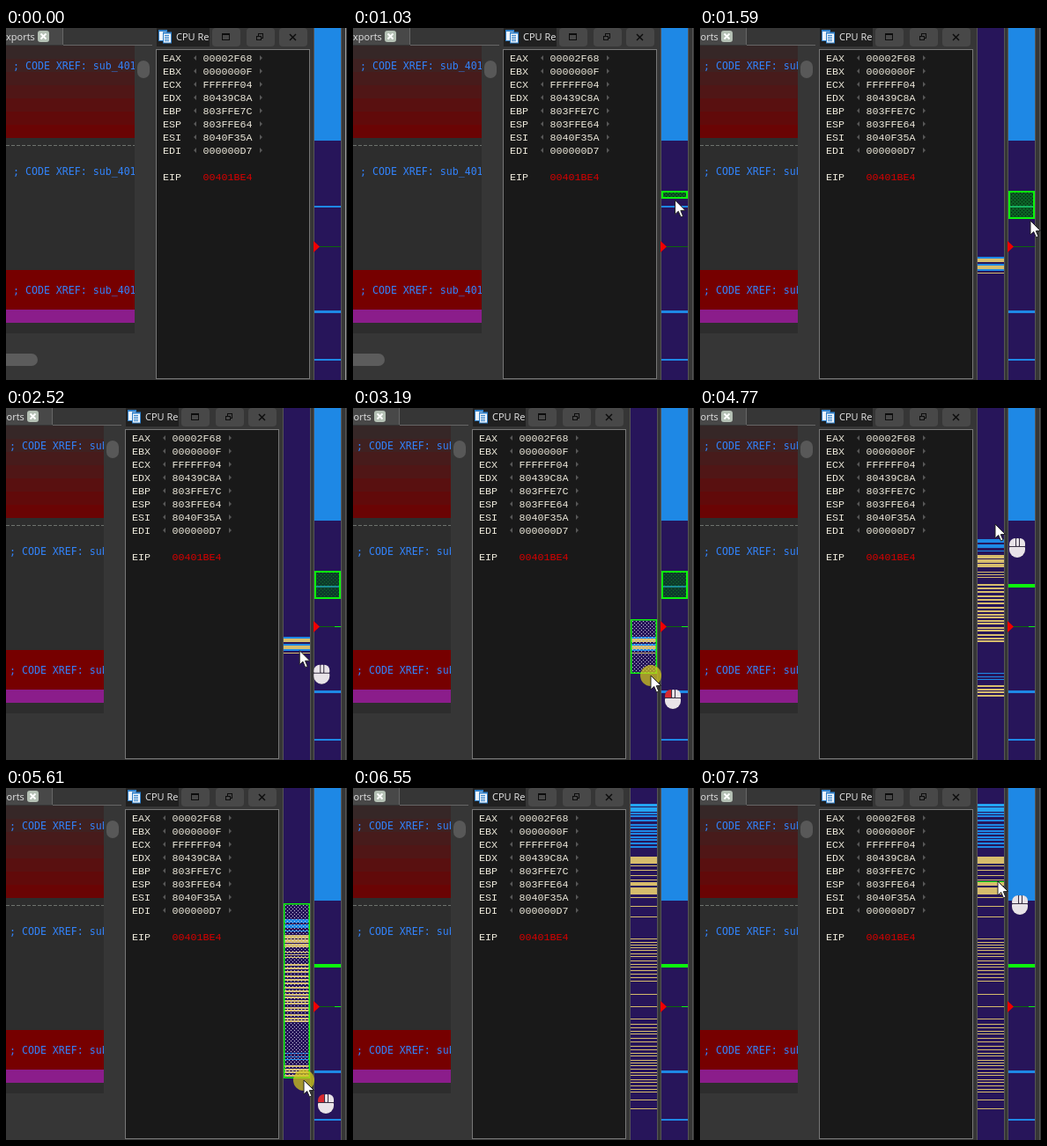
Write an HTML page with a canvas that moves like this. It is 387x400 px and loops after 8000 ms.

```html
<!DOCTYPE html>
<html lang="en">
<head>
<meta charset="utf-8">
<style>
html, body { margin: 0; width: 100%; height: 100%; overflow: hidden; background: #363636; }
canvas { display: block; }
</style>
</head>
<body>
<canvas width="387" height="400"></canvas>
<script>
const ctx = document.querySelector('canvas').getContext('2d');
const LOOP = 8000, SPLIT = 1540, MOUSE_ICON = 2160, ZOOM_1 = 3430, ZOOM_2 = 6120;
const PURPLE = '#27155a', BLUE = '#1e88e5', TAN = '#d6bc6c', GREEN = '#0cf50c', EDGE = '#555';
const CODE_FONT = '11.6px "DejaVu Sans Mono", monospace';
const REGISTER_FONT = '11.67px "Liberation Mono", monospace';
const TITLE_FONT = '11px "Open Sans", sans-serif';

const REGISTERS = ['EAX 00002F68', 'EBX 0000000F', 'ECX FFFFFF04', 'EDX 80439C8A',
  'EBP 803FFE7C', 'ESP 803FFE64', 'ESI 8040F35A', 'EDI 000000D7'];

// Pointer path: each move arrives at x, y and rests there until the next one
const ENTRY = { end: 480, x: 387, y: 231 };
const MOVES = [
  move(480, 790, 362, 187), move(960, 1220, 375, 219), move(1650, 1780, 392, 226),
  move(1780, 1900, 392, 402), move(1900, 2150, 345, 402),
  move(2160, 2620, 330, 241), move(2700, 3190, 338, 304), move(3430, 3700, 334, 308),
  move(3950, 4420, 333, 99), move(4500, 4700, 335, 132), move(4820, 5440, 338, 332),
  move(6300, 6550, 392, 402), move(6600, 6900, 392, 340),
  move(6910, 7300, 341, 148), move(7490, 7730, 338, 106),
];
function move(start, end, x, y) {
  return { start, end, x, y };
}

function rect(color, x, y, w, h) {
  ctx.fillStyle = color;
  ctx.fillRect(x, y, w, h);
}
function frame(color, x, y, w, h, width = 1) {
  ctx.strokeStyle = color;
  ctx.lineWidth = width;
  ctx.strokeRect(x + width / 2, y + width / 2, w - width, h - width);
}
function round(color, x, y, w, h, r) {
  ctx.beginPath();
  ctx.roundRect(x, y, w, h, r);
  ctx.fillStyle = color;
  ctx.fill();
}
function poly(color, points, border) {
  ctx.beginPath();
  points.forEach(([x, y]) => ctx.lineTo(x, y));
  ctx.closePath();
  ctx.fillStyle = color;
  ctx.fill();
  if (border) {
    ctx.strokeStyle = border;
    ctx.lineWidth = 1;
    ctx.stroke();
  }
}
function line(color, width, x0, y0, x1, y1) {
  ctx.beginPath();
  ctx.moveTo(x0, y0);
  ctx.lineTo(x1, y1);
  ctx.strokeStyle = color;
  ctx.lineWidth = width;
  ctx.stroke();
}
function cross(color, width, x, y, size) {
  line(color, width, x, y, x + size, y + size);
  line(color, width, x + size, y, x, y + size);
}
function label(str, x, y, color, font) {
  ctx.font = font;
  ctx.fillStyle = color;
  ctx.fillText(str, x, y);
}
function dots(color, x, y, w, h, step) {
  for (let row = 0; row * 2 < h; row++)
    for (let col = row % 2 * step / 2; col < w; col += step) rect(color, x + col, y + row * 2, 1, 1);
}
// Horizontal lines with slightly uneven spacing, always the same for a given start
function stripes(color, from, to, pitch, thickness) {
  let seed = from;
  for (let y = from; y < to;) {
    rect(color, 315, y, 30, Math.min(thickness, to - y));
    seed = (seed * 73 + 41) % 1009;
    y += Math.max(thickness, pitch + Math.round(seed / 1009 * 2 - 1));
  }
}

function drawEditor(split) {
  const right = split ? 111 : 146, textX = split ? 4 : 8, tabX = split ? -12 : 0;

  rect('#484848', 0, 0, 64 + tabX, 19);
  line('#666', 1, 64.5 + tabX, 0, 64.5 + tabX, 19);
  line('#666', 1, 65 + tabX, 19.5, right + 20, 19.5);
  label('xports', tabX, 14, '#e4e4e4', TITLE_FONT);
  round('#b4c0b4', 36 + tabX, 3, 13, 13, 3);
  cross('#fff', 2, 39.5 + tabX, 6.5, 6);

  ctx.save();
  ctx.beginPath();
  ctx.rect(0, 20, right, 327);
  ctx.clip();
  rect('#2d2d2d', 0, 20, right, 327);
  for (let i = 0; i < 7; i++) {
    const k = i / 6;
    rect(`rgb(${54 + 52 * k}, ${39 - 35 * k}, ${39 - 35 * k})`, 0, 20 + i * 15, right, 15);
  }
  ctx.setLineDash([4, 2]);
  line('#6d726d', 1, 0, 133.5, right, 133.5);
  ctx.setLineDash([]);
  rect('#760000', 0, 275, right, 45);
  rect('#8b1d8b', 0, 320, right, 15);
  [47, 167, 302].forEach(y => label('; CODE XREF: sub_401', textX, y, '#3282fa', CODE_FONT));
  ctx.restore();

  round('#585858', right + 3, 37, 14, 20, 7);
  if (!split) round('#5c5c5c', -10, 370, 46, 14, 7);
}

function drawRegister(name, value, baseline, color) {
  label(name, 178, baseline, '#eeeadc', REGISTER_FONT);
  label(value, 223.5, baseline, color, REGISTER_FONT);
}

function drawRegisters() {
  rect('#191919', 170, 24, 175, 375);
  frame('#777', 170, 24, 175, 375);
  rect('#202020', 171, 0, 60, 21);

  [0, 5].forEach(shift => {
    rect('#2f7fc8', 173 + shift, 2 + shift / 2, 10, 13);
    rect('#eef4fa', 174 + shift, 4 + shift / 2, 8, 10);
  });
  for (let y = 8; y < 16; y += 2) rect('#2f7fc8', 180, y, 5, 1);
  label('CPU Re', 193, 14, '#e8e8e8', TITLE_FONT);

  [234, 273, 310].forEach(x => round('#484848', x, 0, 32, 21, 4));
  const ink = '#0c0c0c';
  frame(ink, 245, 6, 9, 8);
  rect(ink, 245, 6, 9, 2);
  frame(ink, 286, 6, 6, 6);
  rect('#484848', 284, 9, 6, 5);
  frame(ink, 284, 9, 6, 5);
  cross(ink, 1.5, 322, 7, 7);

  REGISTERS.forEach((entry, i) => {
    const y = 38 + i * 15;
    drawRegister(...entry.split(' '), y, '#eeeadc');
    poly('#585858', [[216, y - 7], [213, y - 4], [216, y - 1]]);
    poly('#585858', [[288, y - 7], [291, y - 4], [288, y - 1]]);
  });
  drawRegister('EIP', '00401BE4', 173, '#d90000');
}

function drawMainStrip(t, pointer) {
  rect(PURPLE, 350, 0, 30, 400);
  rect(BLUE, 350, 0, 30, 128);
  rect(BLUE, 350, 321, 30, 3);
  rect(BLUE, 350, 376, 30, 2);
  [349, 380].forEach(x => rect(EDGE, x, 0, 1, 400));
  rect(t < 960 ? '#a0a0a0' : EDGE, 385, 0, 1, 400);

  if (t >= ZOOM_1) {
    rect(GREEN, 350, 200, 30, 4);
  } else {
    const height = t < 960 ? 0 : Math.round(Math.min(32, pointer.y - 187));
    const fresh = t < MOUSE_ICON;
    if (height > 1) {
      rect(fresh ? '#0c5f25' : '#0d3c2c', 350, 185, 30, height);
      dots(fresh ? '#04200f' : '#14702c', 351, 187, 28, height - 3, 4);
    }
    rect(height < 18 ? BLUE : fresh ? '#16b060' : '#1a8c92', 350, 202, 30, 2);
    if (height > 1) frame(GREEN, 350, 185, 30, height, 2);
  }

  rect('#0c650c', 355, 248, 25, 1);
  if (t > MOUSE_ICON) rect(GREEN, 373, 248, 7, 1);
  poly('#f00000', [[349, 242], [356, 248.5], [349, 255]]);
}

function drawOverview() {
  stripes(BLUE, 260, 276, 7, 2);
  stripes(TAN, 262, 279, 7, 4);
}
function drawMiddle() {
  stripes(BLUE, 149, 161, 5, 4);
  stripes(BLUE, 162, 165, 2, 1);
  stripes(TAN, 167, 184, 6, 4);
  stripes(TAN, 186, 194, 3, 1);
  stripes(TAN, 200, 266, 4, 2);
  stripes(BLUE, 301, 310, 3, 1);
  stripes(TAN, 315, 328, 3, 2);
}
function drawDetail() {
  stripes('#24a4f2', 18, 27, 4, 3);
  stripes(BLUE, 28, 69, 4, 2);
  stripes(TAN, 78, 86, 8, 8);
  stripes(TAN, 88, 105, 5, 1);
  stripes(TAN, 107, 121, 5, 4);
  stripes(TAN, 124, 148, 11, 1);
  stripes(TAN, 171, 219, 4, 1);
  stripes(TAN, 219, 268, 14, 1);
  stripes(TAN, 268, 346, 4, 1);
  stripes(TAN, 354, 370, 10, 1);
}

function drawSecondStrip(t, pointer, pressed) {
  rect(PURPLE, 315, 0, 30, 400);
  [314, 345].forEach(x => rect(EDGE, x, 0, 1, 400));
  if (t < ZOOM_1) drawOverview();
  else if (t < ZOOM_2) drawMiddle();
  else drawDetail();

  if (pressed) {
    const top = t < ZOOM_1 ? 240 : 131;
    const height = Math.max(2, Math.round(pointer.y) - 2 - top);
    dots('#c9c4dc', 317, top + 2, 27, height - 3, 4);
    frame(GREEN, 315, top, 30, height, 1.5);
  } else if (t > ZOOM_2 + 500 && pointer.x < 345) {
    rect(GREEN, 315, Math.round(pointer.y), 30, 1);
  }
}

function drawMouse(pressed) {
  const shell = '#e8e3e8';
  round('#3a3244', 16, 16, 18, 22, [8, 8, 9, 9]);
  round(pressed ? '#d82a30' : shell, 16, 16, 7, 9, [7, 0, 0, 1]);
  round(shell, 24, 16, 3, 9, 1);
  round(shell, 28, 16, 6, 9, [0, 7, 1, 0]);
  round(shell, 16, 26, 18, 12, [1, 1, 9, 9]);
}

function drawPointer({ x, y }, withMouse, pressed) {
  if (pressed) {
    ctx.beginPath();
    ctx.arc(x, y, 12, 0, 7);
    ctx.fillStyle = 'rgba(214, 202, 28, .72)';
    ctx.fill();
  }
  ctx.save();
  ctx.translate(x, y);
  poly('#fff', [[0, 0], [0, 16], [3.7, 12.5], [6.5, 19], [9, 18], [6.3, 11.7], [11.5, 11.5]], '#222');
  if (withMouse) drawMouse(pressed);
  ctx.restore();
}

function pointerAt(t) {
  const i = MOVES.findLastIndex(({ start }) => t >= start);
  if (i < 0) return { x: ENTRY.x, y: ENTRY.y };
  const from = MOVES[i - 1] || ENTRY, to = MOVES[i];
  const k = Math.min(1, (t - to.start) / (to.end - to.start));
  return { x: from.x + (to.x - from.x) * k, y: from.y + (to.y - from.y) * k };
}

function draw(t) {
  const split = t >= SPLIT, pointer = pointerAt(t);
  const pressed = t >= 2660 && t < ZOOM_1 || t >= 4820 && t < ZOOM_2;
  rect('#363636', 0, 0, 387, 400);
  drawEditor(split);
  ctx.save();
  if (split) ctx.translate(-35, 0);
  drawRegisters();
  ctx.restore();
  if (split) drawSecondStrip(t, pointer, pressed);
  drawMainStrip(t, pointer);
  if (pointer.x < 387) drawPointer(pointer, t >= MOUSE_ICON, pressed);
}

const start = performance.now();
function tick() {
  draw((performance.now() - start) % LOOP);
  requestAnimationFrame(tick);
}
tick();
</script>
</body>
</html>
```
